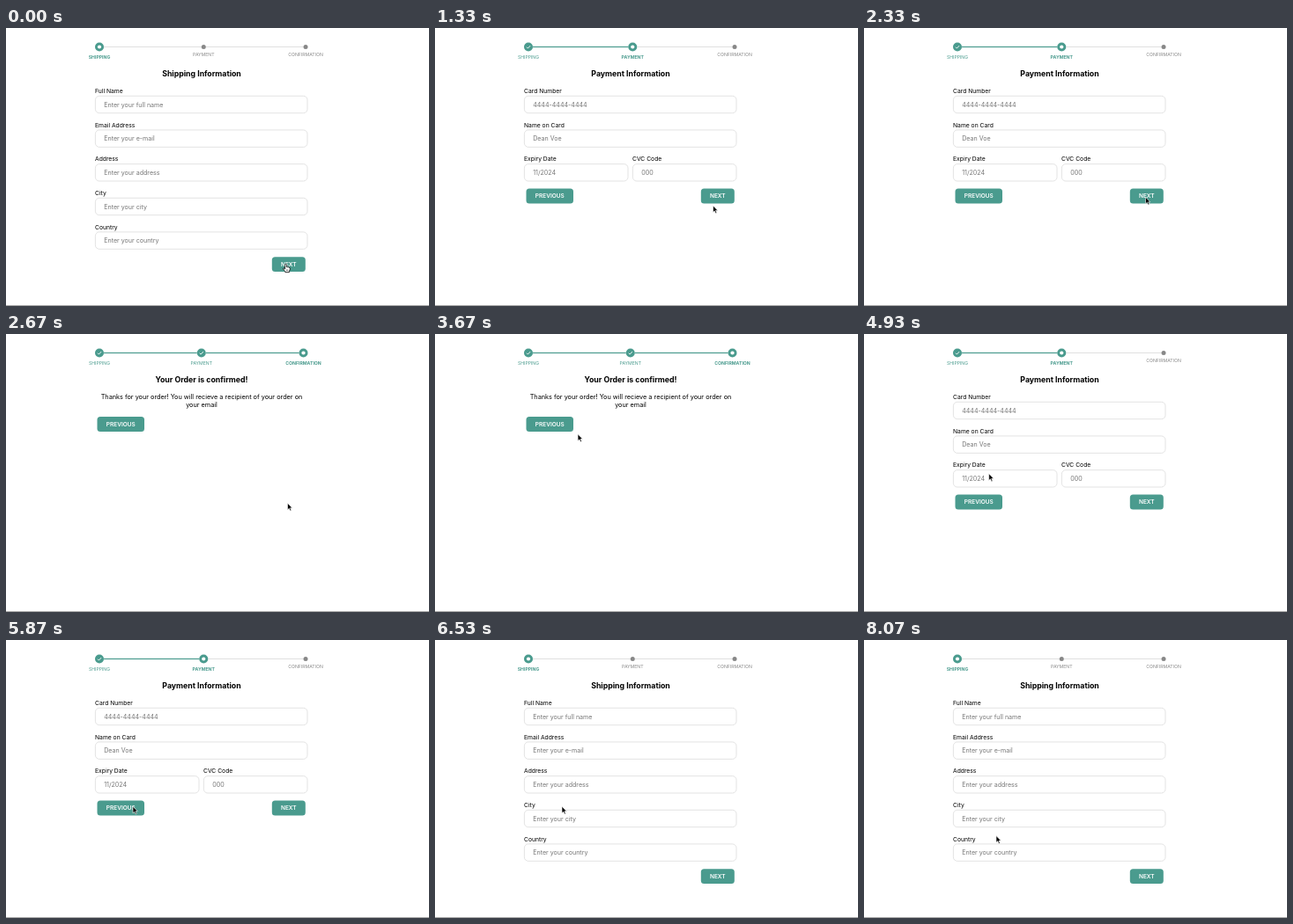
Recreate the animation shown at these times as an HTML page. Size 480x316 px, loop 8.14 s.

```html
<!DOCTYPE html>
<html lang="en">
<head>
<meta charset="utf-8">
<title>Checkout steps</title>
<style>
html, body { margin: 0; width: 100%; height: 100%; overflow: hidden; background: #fff; }
svg { display: block; width: 100%; height: 100%; font-family: Inter, "Liberation Sans", sans-serif; }
.title { font-size: 8.75px; font-weight: 700; text-anchor: middle; }
.label { font-size: 6.75px; }
.hint { font-size: 7.1px; fill: #757575; }
.body { font-size: 7.3px; text-anchor: middle; }
.btn { font-size: 6.5px; font-weight: 600; fill: #fff; text-anchor: middle; }
.step { font-size: 5.15px; text-anchor: middle; }
.box { fill: #fff; stroke: #dcdcdc; stroke-width: .8; }
</style>
</head>
<body>
<svg id="stage" viewBox="0 0 480 316"></svg>
<script>
const LOOP = 8140, TICK = 200 / 3;
const GREEN = [74, 155, 142], GREY = [136, 136, 136];
const LEFT = 101, WIDTH = 241.5, MID = 21.5;
const NAMES = ["SHIPPING", "PAYMENT", "CONFIRMATION"];

const rgb = c => `rgb(${c.map(Math.round)})`;
const mix = (a, b, p) => a + (b - a) * p;
const text = (cls, x, y, s) => `<text class="${cls}" x="${x}" y="${y}">${s}</text>`;
const title = s => text("title", 222, 55, s);

function field(row, label, hint, x = LEFT, w = 241) {
  const y = 77.3 + row * 38.65;
  return text("label", x, y - 3.4, label) +
    `<rect class="box" x="${x + .4}" y="${y}" width="${w - .4}" height="19.4" rx="4.5"/>` +
    text("hint", x + 10.2, y + 12.3, hint);
}

function button(x, y, w, s) {
  return `<rect x="${x}" y="${y}" width="${w}" height="16.8" rx="3.5" fill="${rgb(GREEN)}"/>` +
    text("btn", x + w / 2, y + 10.8, s);
}
const next = y => button(301.8, y, 38, "NEXT");
const previous = y => button(103.5, y, 53.5, "PREVIOUS");

const pages = [
  title("Shipping Information") +
    field(0, "Full Name", "Enter your full name") +
    field(1, "Email Address", "Enter your e-mail") +
    field(2, "Address", "Enter your address") +
    field(3, "City", "Enter your city") +
    field(4, "Country", "Enter your country") +
    next(260.2),
  title("Payment Information") +
    field(0, "Card Number", "4444-4444-4444") +
    field(1, "Name on Card", "Dean Voe") +
    field(2, "Expiry Date", "11/2024", LEFT, 118) +
    field(2, "CVC Code", "000", 224, 118) +
    previous(182.6) + next(182.6),
  title("Your Order is confirmed!") +
    text("body", 222, 73.8, "Thanks for your order! You will recieve a recipient of your order on") +
    text("body", 222, 83.4, "your email") +
    previous(94.1)
];

const arrow = `<path d="M0 0V7.6L1.8 6L3 8.8L4.3 8.2L3.1 5.5H5.4Z"
  fill="#000" stroke="#fff" stroke-width=".6" stroke-linejoin="round"/>`;
const hand = `<path d="M-.9 .8Q-.8 -.2 0 -.2Q.8 -.2 .9 .8V3.1Q1.7 2.6 2.3 3.3Q3.2 2.9 3.7 3.7Q4.8 3.5 4.9 4.6
  Q5 6.6 3.9 7.8V9.2H-.7V8.2Q-2.2 6.8 -3 5.2Q-2.9 4.1 -1.8 4.7L-.9 5.5Z"
  fill="#fff" stroke="#000" stroke-width=".8" stroke-linejoin="round"/>
  <path d="M.9 6V7.8M2.2 6V7.8" stroke="#000" stroke-width=".5"/>`;

const stage = document.getElementById("stage");
stage.innerHTML = `<rect width="480" height="316" fill="#fff"/>
  <rect y="315" width="480" height="1" fill="#a6a6a6"/>
  <g id="steps"></g>` +
  pages.map(p => `<g class="page">${p}</g>`).join("") +
  `<g id="cursor"><g id="arrow">${arrow}</g><g id="hand">${hand}</g></g>`;
const $ = id => document.getElementById(id);
const pageEls = [...stage.querySelectorAll(".page")];
const show = (el, on) => el.setAttribute("display", on ? "inline" : "none");

// [start, from page, to page]
const changes = [[400, 0, 1], [2400, 1, 2], [4400, 2, 1], [5933, 1, 0]];
const hovers = [[0, 333], [1400, 2333], [3733, 4333], [5266, 5866]];

// [time, x, y] of the pointer
const path = [
  [0, 317.5, 268.5], [933, 317.5, 268.5], [1333, 315.5, 202], [1533, 319.5, 192.3],
  [3066, 319.5, 192.3], [3800, 147.3, 106.5], [4400, 147.3, 106.5],
  [5133, 138, 180], [5200, 135.5, 184], [5333, 144, 189.2], [7066, 144, 189.2],
  [7533, 137, 204], [7933, 146, 218.8], [8066, 150, 222.6], [8200, 150, 222.6]
];

// Monotone cubic through the path points
function pointer(t, axis) {
  const rate = i => i < 0 || i > path.length - 2 ? 0 :
    (path[i + 1][axis] - path[i][axis]) / (path[i + 1][0] - path[i][0]);
  const slope = i => {
    const a = rate(i - 1), b = rate(i);
    return a * b <= 0 ? 0 : 2 * a * b / (a + b);
  };
  let i = 0;
  while (i < path.length - 2 && path[i + 1][0] <= t) i++;
  const h = path[i + 1][0] - path[i][0], u = (t - path[i][0]) / h, v = 1 - u;
  return path[i][axis] * (1 + 2 * u) * v * v + path[i + 1][axis] * u * u * (3 - 2 * u) +
    h * (slope(i) * u * v * v - slope(i + 1) * u * u * v);
}

function drawSteps(from, to, p) {
  const on = i => mix(+(i <= from), +(i <= to), p);
  const radii = NAMES.map((_, i) => mix(2.5, 5, on(i)));
  const gap = (WIDTH - 2 * radii.reduce((a, b) => a + b)) / 2;
  let x = LEFT, lines = "", dots = "";
  NAMES.forEach((name, i) => {
    const r = radii[i], cx = x + r, end = x + 2 * r;
    if (i < 2) {
      const done = mix(+(i < from), +(i < to), p);
      lines += `<rect x="${end}" y="21" width="${gap}" height="1" fill="#e0e0e0"/>` +
        `<rect x="${end}" y="20.9" width="${gap * done}" height="1.2" fill="${rgb(GREEN)}"/>`;
    }
    const fill = rgb(GREY.map((c, k) => mix(c, GREEN[k], on(i))));
    dots += `<circle cx="${cx}" cy="${MID}" r="${r}" fill="${fill}"/>`;
    if (i === to) dots += `<circle cx="${cx}" cy="${MID}" r="${r * .42}" fill="#fff"/>`;
    if (i < to) dots += `<path d="M${cx - 2} ${MID + .2}l1.4 1.4l2.7 -3" fill="none" stroke="#fff" stroke-width=".9"/>`;
    dots += `<text class="step" x="${cx}" y="${MID + r + 8.3}" font-weight="${i === to ? 700 : 400}"` +
      ` fill="${rgb(i <= to ? GREEN : GREY)}">${name}</text>`;
    x = end + gap;
  });
  $("steps").innerHTML = lines + dots;
}

function render(time) {
  const t = Math.floor((time % LOOP + 5) / TICK) * TICK + 1;
  let from = 0, to = 0, p = 1;
  for (const [start, a, b] of changes) {
    if (t < start) break;
    from = a;
    to = b;
    p = Math.min(1, (t - start) / 266);
  }
  p = p < .02 ? 0 : p * p * (3 - 2 * p);
  drawSteps(from, to, p);
  pageEls.forEach((el, i) => show(el, i === to));
  const over = hovers.some(([a, b]) => t >= a && t < b);
  show($("hand"), over);
  show($("arrow"), !over);
  $("cursor").setAttribute("transform", `translate(${pointer(t, 1)} ${pointer(t, 2)})`);
}

let begin;
function loop(now) {
  begin ??= now;
  render(now - begin);
  requestAnimationFrame(loop);
}
render(0);
requestAnimationFrame(loop);
</script>
</body>
</html>
```
